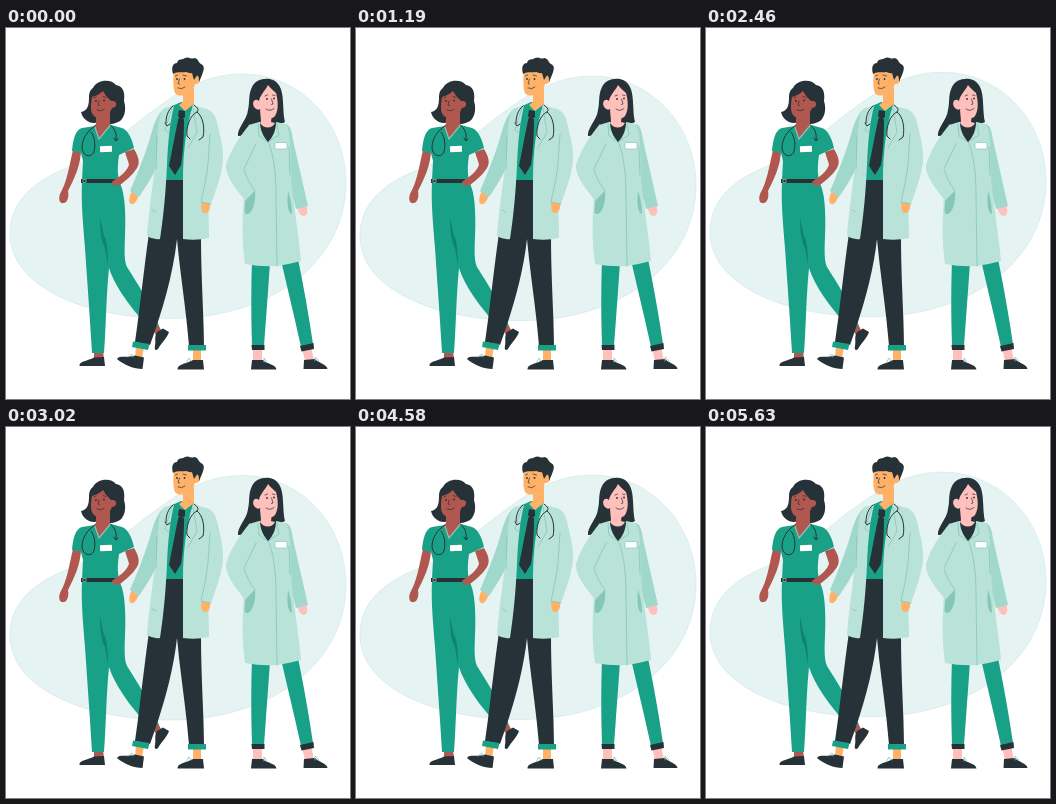
Recreate the animation shown at these times as an HTML page. Size 344x371 px, loop 5700 ms.

```html
<!DOCTYPE html>
<html lang="en">
<head>
<meta charset="utf-8">
<title>Medical team</title>
<style>
  html, body { margin: 0; width: 100%; height: 100%; overflow: hidden; background: #fff; }
  svg { display: block; width: 100%; height: 100%; }
  .blob { fill: #e6f3f3; stroke: #c3e4dd; stroke-width: .5; }
  .dark { fill: #263238; }
  .teal { fill: #18a187; }
  .shade { fill: #128270; }
  .coat { fill: #b9e2d9; }
  .sleeve { fill: #a0d8cc; }
  .pocket { fill: #84c7b9; }
  .brown { fill: #b0584f; }
  .tan { fill: #ffb168; }
  .pink { fill: #ffc0bb; }
  .white { fill: #fff; }
  .line { fill: none; stroke: #263238; stroke-width: 1; stroke-linecap: round; stroke-linejoin: round; }
  .thin { stroke-width: .7; }
  .seam { fill: none; stroke: #86c6b9; stroke-width: .8; stroke-linecap: round; }
  .trim { fill: none; stroke: #84c7b9; stroke-width: 1.2; }
</style>
</head>
<body>
<svg viewBox="0 0 344 371">
  <path id="blob" class="blob" d="M4 206C4 171 31 152 61 140C97 126 122 100 152 79C178 60 203 46 236 46C296 46 340 96 340 155C340 232 268 290 165 290.500C75 290.500 4 257 4 206Z"/>

  <g id="nurse">
    <path class="dark" d="M87 60C90 52 105 50 110 57C118 58 119 66 118 73C121 82 118 92 112 94C106 97 98 97 92 94C86 97 77 93 75 84C81 83 83 78 83 70C83 65 84 62 87 60Z"/>
    <path class="brown" d="M67 122L75 124C74 139 68 151 62 163C63 168 62 174 58 175C54 176 52 172 54 166C61 154 63 139 67 122Z"/>
    <path class="brown" d="M88 323H97L98 331H88ZM147 302L152 296L155 302L150 307Z"/>
    <path class="dark" d="M88 329.500L98 329L99 338H73.500C73 333 82 333 88 329.500Z"/>
    <path class="dark" d="M151 304L157 300.500L163 304C161 310 156 314 152 321C150 323 148 322 149 318C150 312 148 309 151 304Z"/>
    <path class="teal" d="M76 154H113C119 163 120 185 119 208C118.500 222 118 233 121 239C131 255 143 273 152.500 297L147 304C130 286 110 262 103 240C100 270 100 300 98 325H86C84 290 81 250 79 220C77 195 75 175 76 154Z"/>
    <path class="shade" d="M94 190C94 203 95 213 99 220L102 238C102 225 101 211 98 208Z"/>
    <path class="teal" d="M89 98L76 100C69 102 67 112 66 123L75 125L77 133L76 152H113C111 143 112 135 113 127L128 120C126 111 122 102 116 100L105 97Z"/>
    <path class="brown" d="M90 86L104 83V97C102 102 97 107 93 111C91 107 89 102 88 98L90 96Z"/>
    <path class="brown" d="M86 69C85 75 84 83 87 87C91 92 100 90 104 84L106 80C110 80 112 75 108 73L105 73C102 70 99 67 97 63C94 66 90 68 86 69Z"/>
    <path class="trim" d="M88.500 98L93 111L104.500 97"/>
    <rect class="dark" x="75" y="151" width="38" height="4"/>
    <rect class="trim" style="stroke-width:.7" x="77" y="151.500" width="3" height="3"/>
    <path class="brown" d="M128 121C133 129 134 135 131 140C126 148 119 153 114 157C110 159 106 157 106 154C110 150 119 147 123 137C122 132 120 128 119 124Z"/>
    <path class="line" d="M89 98C81 103 76 111 76 120C77 128 84 130 87.500 125C90 118 89 109 85 104M104.500 97C109 101 111 106 110 112M108 110L110 113L112 111"/>
    <rect class="white" x="94" y="118" width="12" height="6" rx=".5" transform="rotate(-2 100 121)"/>
    <circle class="dark" cx="90" cy="73" r=".9"/>
    <circle class="dark" cx="98" cy="72.500" r=".9"/>
    <path class="line thin" d="M88 70L90 69M97 68.500L100 69.500M93 73L92 77L93.500 77.500M91 82Q95 84 98 81.500"/>
  </g>

  <g id="doctor">
    <path class="tan" d="M130 317L138 319L136 331H129ZM187 319H195V334H187Z"/>
    <path class="dark" d="M129 327.500L138 329.500L136.500 341C128 341 118 337 111 331C113 327 122 330 129 327.500ZM187 332H197L198 341.500H171.500C171 336 180 336 187 332Z"/>
    <path class="seam" d="M122 329L126 326L127 329M180 335L183 330L185 333"/>
    <path class="dark" d="M159 150H180L186 208H195C195 250 198 290 198 318H183C180 280 174 245 171 211C167 247 156 284 144 317L129 314C134 280 138 240 143 205Z"/>
    <path class="teal" d="M127 313.500L143.500 316L142 322L126 319ZM182 317H200V322.500H182Z"/>
    <path class="tan" d="M126 163L133 167C131 172 129 177 125 176C122 175 123 168 126 163Z"/>
    <path class="teal" d="M164 79L175 74L187 76L181 152H158Z"/>
    <path class="sleeve" d="M158 81C151 86 148 96 144 110C138 130 130 149 124 163L133 169C140 158 147 148 152 136Z"/>
    <path class="coat" d="M168 78L158 80C152 86 152 103 151 122C148 150 143 180 141 208Q147 212 154 211C158 185 160 160 161 137C162 113 164 94 168 78Z"/>
    <path class="coat" d="M187 77L200 81C207 84 204 99 203 117C200 145 203 180 203 210Q190 213 177 211V151C177 126 180 98 187 77Z"/>
    <path class="tan" d="M195.500 173H204C205 180 203 186 198 185C195 184 195 179 195.500 173Z"/>
    <path class="coat" d="M199 80.500C211 83 211 96 215 111C217 122 218 132 216 140C214 152 209 164 205 176L195 174C198 160 201 148 202 135Z"/>
    <path class="seam" d="M166 80L159 102L163 105M187 80L191 104L182 120M151 109L150 141M204 106L202 135C201 148 198 160 195 174L205 176M146 182L150 184"/>
    <path class="tan" d="M177 60H188V76L179 83L173 77L177 74Z"/>
    <path class="dark" d="M173 82L179 83L179 89L175 92L172 88ZM172.500 90L178 91C178 107 177 124 175 137L169 147L163 138C166 123 169 106 172.500 90Z"/>
    <path class="tan" d="M168 43C167 51 167 60 169 65C173 70 182 67 187 61L189 56C194 57 196 49 192 47L188 49L187 42Z"/>
    <path class="dark" d="M167 46C165 39 167 35 171 35C172 30 177 32 179 30C183 28 185 32 188 30C192 30 192 34 195 36C200 38 197 44 196 47L193 54C193 51 193 48 191 47.500L188 52L186 45C184 46 182 44 180 44C176 45 172 43 167 46Z"/>
    <path class="line" d="M167 78C162 82 160 88 160 95M159 95L161 98L164 96M188 77C192 80 193 82 191 84C184 87 180 99 181 108L184 111M191 84C197 88 199 100 197 109L193 112"/>
    <circle class="dark" cx="171" cy="51" r=".9"/>
    <circle class="dark" cx="178.500" cy="51" r=".9"/>
    <path class="line thin" d="M169.500 48L171.500 47M177 47L180.500 48M173.500 51L172 55.500L173.500 56M172 60Q176 62 179 59"/>
  </g>

  <g id="physician">
    <path class="dark" d="M246 59C250 49 267 48 272 56C279 64 276 81 279 94C272 98 262 97 255 95C249 101 240 108 232 108C231 100 241 92 242 82C244 74 242 67 246 59Z"/>
    <path class="pink" d="M247 320H256V334H247ZM296 320L305 318L308 333H299Z"/>
    <path class="dark" d="M246 332H257C260 336 270 336 270.500 341.500H245ZM298 332L309 331C312 335 321 336 321.500 341H297.500Z"/>
    <path class="seam" d="M258 334L258 330L261 334M309 333L309 329L313 333"/>
    <path class="teal" d="M246 232L264 234C262 265 260 290 258 318H246C245 290 245 260 246 232ZM275 232L292 231C298 260 303 289 307 316L295 319C289 291 282 263 275 232Z"/>
    <path class="dark" d="M245.500 317H258.500V322H246ZM294 318L307.500 315L308 321L295.500 323.500Z"/>
    <path class="pink" d="M291 179L300 177C302 182 302 187 298 188C294 188 293 184 291 179Z"/>
    <path class="sleeve" d="M280 96C285 98 286 105 287 112L302 178L290 181L280 142Z"/>
    <path class="coat" d="M253 94L243 97C238 110 239 127 239 143L237 186C236 205 237 220 239 236Q255 239 271 238Q284 236 295 233C293 207 286 169 285 145C284 126 285 104 280 96L270 94Z"/>
    <path class="pocket" d="M239 168C240 176 237 184 240 186C246 187 250 175 249 163ZM282 163C285 171 286 180 286 186C281 184 281 174 282 163Z"/>
    <path class="coat" d="M244 96C234 108 225 121 220 137C219 147 230 162 240 173L249 163C244 155 239 147 238 141L248 120Z"/>
    <path class="seam" d="M250 116L238 141C240 149 244 156 249 163L240 172M262 113C268 127 270 147 270 167L271 238M252 96L253 108L262 114L273 107L271 96M283 119L284 147"/>
    <path class="dark" d="M254 94H270C270 102 267 109 262 114C257 108 254 102 254 94Z"/>
    <path class="pink" d="M254 82L266 86L265 94L269 95C266 101 258 101 254 95L255 93Z"/>
    <path class="pink" d="M262 57C259 63 254 67 253 73C248 69 245 76 249 80C251 82 253 82 254 81C256 89 265 93 269 88C273 82 272 72 270 65C267 62 264 60 262 57Z"/>
    <rect class="white" x="269" y="114.500" width="12" height="6.500" rx="1" stroke="#84c7b9" stroke-width=".7"/>
    <circle class="dark" cx="261" cy="71" r=".9"/>
    <circle class="dark" cx="268" cy="70.500" r=".9"/>
    <path class="line thin" d="M259 68L261.500 67M266.500 67L269 67.500M265.500 71L267 76L265.500 76.500M260 81Q264 84 268 80.500"/>
  </g>
</svg>
<script>
  const blob = document.getElementById('blob');
  const LOOP = 5700, STEP = LOOP / 81;
  const PERIOD = STEP * 22.5, LOWEST = 473;
  const TOP = -5.7, TRAVEL = 9.5;

  // Linear rise and fall, held for each step
  function bob(ms) {
    const t = Math.floor(ms / STEP) * STEP;
    const phase = ((t - LOWEST) / PERIOD + 1) % 1;
    return TOP + TRAVEL * (1 - Math.abs(1 - 2 * phase));
  }

  function draw() {
    blob.setAttribute('transform', `translate(0 ${bob(performance.now() % LOOP).toFixed(2)})`);
    requestAnimationFrame(draw);
  }
  draw();
</script>
</body>
</html>
```
